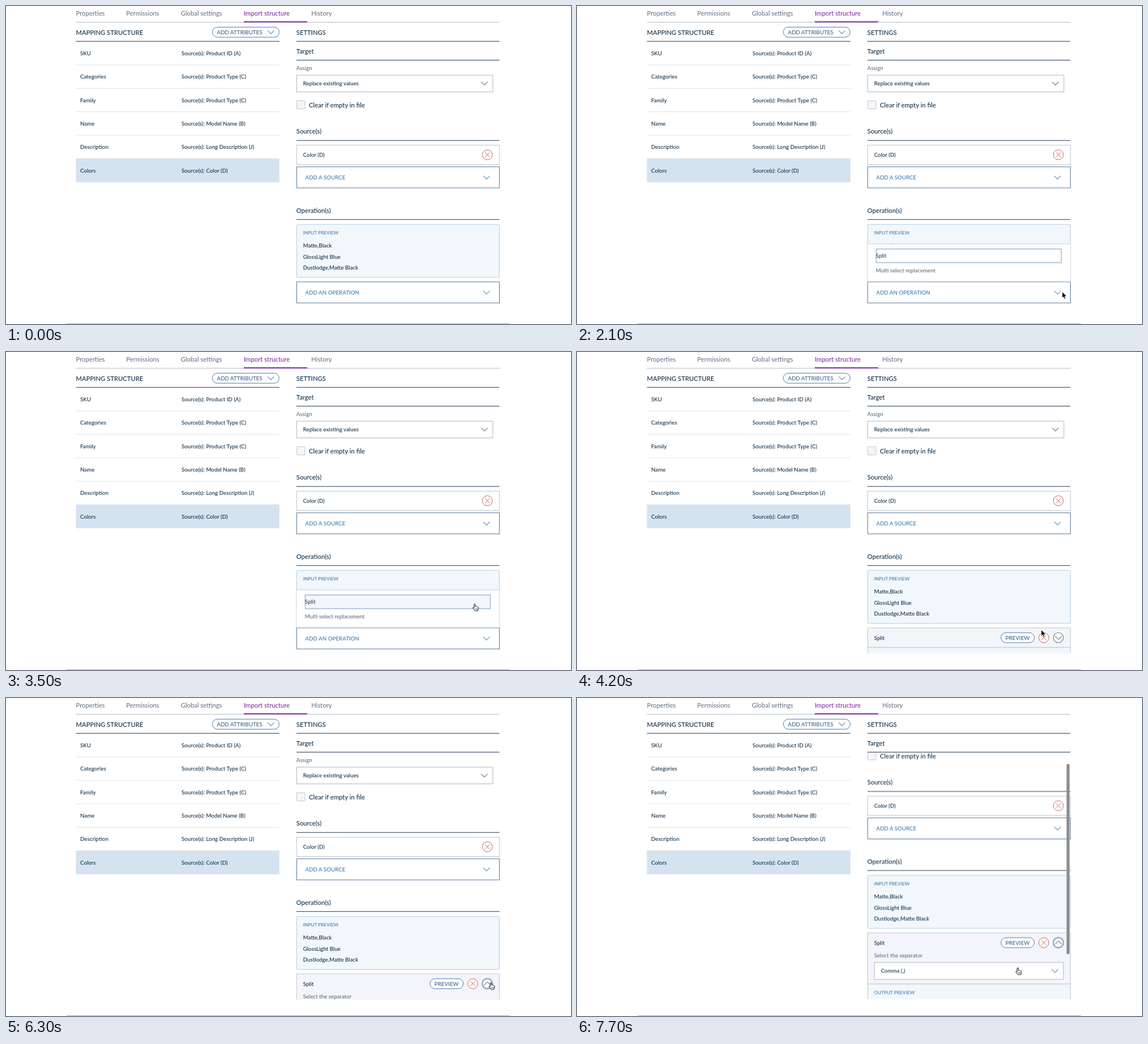
Recreate the animation shown at these times as an HTML page. Size 998x561 px, loop 8 s.

```html
<!DOCTYPE html>
<html lang="en">
<head>
<meta charset="utf-8">
<title>Import structure</title>
<style>
html, body { margin: 0; width: 100%; height: 100%; overflow: hidden; background: #fff; }
svg { display: block; width: 998px; height: 561px; }
text { font: 500 9.75px Lato, sans-serif; fill: #11304a; }
.h { font-size: 11.25px; }
.tab { font-size: 11.25px; font-weight: 400; fill: #5f6c80; }
.on { font-weight: 500; fill: #842fa6; }
.soft { font-weight: 400; fill: #526176; }
.act { fill: #3f7cae; }
.cap { font-size: 8.25px; fill: #3f7cae; }
.rule { stroke: #24384f; }
.sep { stroke: #dfe1e6; }
.box { fill: #fff; stroke: #bfc4cd; }
.field { fill: #fff; stroke: #b0b5c0; }
.add { fill: #fff; stroke: #56789a; }
.pill { fill: #fff; stroke: #4a7ba8; }
.note { fill: #f2f7fb; stroke: #b4cfe5; }
.mark { fill: #d5e3f0; }
.line { fill: none; stroke: #6d7a8c; stroke-width: 1.1; }
.blue { stroke: #4f8fbd; }
.red { fill: #fff; stroke: #c4625c; }

/* State changes are hard cuts on a 700 ms grid (8.75 % of the loop). */
.t { animation: 8s step-end infinite; }
#addOp { animation-name: addOp; }
#menu { animation-name: menu; }
#option { animation-name: option; }
#split { animation-name: split; }
#shut { animation-name: shut; }
#open { animation-name: open; }
#panel { animation-name: panel; }
#scroll { animation-name: scroll; }
#hover { animation-name: hover; }
#thumb { animation-name: thumb; }
#arrow { animation-name: arrow; }
#hand { animation-name: hand; }
@keyframes addOp { 0% { opacity: 1 } 52.5%, 100% { opacity: 0 } }
@keyframes menu { 0% { opacity: 0 } 17.5% { opacity: 1 } 52.5%, 100% { opacity: 0 } }
@keyframes option { 0% { fill: #fff } 35%, 100% { fill: #f3f6fb } }
@keyframes split { 0% { opacity: 0 } 52.5%, 100% { opacity: 1 } }
@keyframes shut { 0% { opacity: 1 } 78.75%, 100% { opacity: 0 } }
@keyframes open { 0% { opacity: 0 } 78.75%, 100% { opacity: 1 } }
@keyframes panel { 0% { fill: #f4f5fa } 87.5% { fill: #fff } 96.25%, 100% { fill: #f4f5fa } }
@keyframes scroll {
  0% { transform: none }
  87.5% { transform: translateY(-69.4px) }
  96.25%, 100% { transform: translateY(-72.4px) }
}
@keyframes hover { 0% { opacity: 0 } 87.5% { opacity: 1 } 96.25%, 100% { opacity: 0 } }
@keyframes thumb {
  0% { opacity: 0; fill: #666 }
  87.5% { opacity: 1; fill: #666 }
  96.25%, 100% { opacity: 1; fill: #8e8e8e; transform: translateY(2.4px) }
}
@keyframes arrow {
  0% { opacity: 0 }
  8.75% { opacity: 1; transform: translate(857px, 504px) }
  35% { opacity: 0 }
  52.5% { opacity: 1; transform: translate(820px, 490px) }
  70%, 100% { opacity: 0 }
}
@keyframes hand {
  0% { opacity: 0 }
  35% { opacity: 1; transform: translate(836px, 451px) }
  43.75% { opacity: 1; transform: translate(829.5px, 450.5px) }
  52.5% { opacity: 0 }
  70% { opacity: 1; transform: translate(856px, 507px) }
  78.75% { opacity: 1; transform: translate(858px, 508px) }
  87.5% { opacity: 1; transform: translate(847.5px, 473px) }
  96.25%, 100% { opacity: 1; transform: translate(780px, 482px) }
}
</style>
</head>
<body>
<svg viewBox="0 0 998 561">
  <defs>
    <path id="down" d="M-5.7-2.8 0 2.8 5.7-2.8"/>
    <g id="remove">
      <circle class="red" r="8.8"/>
      <path class="red" d="M-4-4 4 4M4-4-4 4"/>
    </g>
    <clipPath id="view"><rect x="505" y="96" width="375" height="435.5"/></clipPath>
  </defs>

  <!-- Tabs -->
  <text class="tab" x="123.5" y="16.8">Properties</text>
  <text class="tab" x="212.3" y="16.8">Permissions</text>
  <text class="tab" x="308.8" y="16.8">Global settings</text>
  <text class="tab on" x="420" y="16.8">Import structure</text>
  <text class="tab" x="539.3" y="16.8">History</text>
  <path d="M123.5 28.7H871.5" stroke="#b4b7be"/>
  <path d="M420 28H532" stroke="#842fa6" stroke-width="2"/>

  <!-- Mapping -->
  <text class="h" x="123.5" y="50.5">MAPPING STRUCTURE</text>
  <rect class="pill" x="364.5" y="37.3" width="118" height="17.8" rx="8.9"/>
  <text x="372.5" y="49.8" style="fill:#3c6288">ADD ATTRIBUTES</text>
  <use class="line blue" href="#down" x="468" y="46.2"/>
  <path class="rule" d="M123.5 62.3H483"/>
  <g id="rows"></g>

  <!-- Settings -->
  <text class="h" x="512.8" y="50.5">SETTINGS</text>
  <path class="rule" d="M513 62.3H871.5"/>
  <text class="h" x="512.8" y="83.5">Target</text>

  <g clip-path="url(#view)">
    <g id="scroll" class="t">
      <text class="soft" x="512.8" y="113">Assign</text>
      <rect class="field" x="513.5" y="122" width="346.5" height="29.5"/>
      <text x="524.7" y="140.3">Replace existing values</text>
      <use class="line" href="#down" x="845" y="136.6"/>
      <rect x="513.5" y="167" width="14.5" height="14.5" rx="1" fill="#f5f5fa" stroke="#c3c7d3"/>
      <text class="h" x="535" y="178.6">Clear if empty in file</text>

      <text class="h" x="512.8" y="225.4">Source(s)</text>
      <path class="rule" d="M513 237.2H871.5"/>
      <rect class="box" x="513.5" y="245.5" width="358" height="34"/>
      <text x="524.7" y="266.2">Color (D)</text>
      <use href="#remove" x="850.3" y="262.4"/>
      <rect class="add" x="513.5" y="283.7" width="358" height="37.2"/>
      <text class="act" x="528.5" y="306">ADD A SOURCE</text>
      <use class="line blue" href="#down" x="848.8" y="302.4"/>

      <text class="h" x="512.8" y="365">Operation(s)</text>
      <path class="rule" d="M513 376.7H871.5"/>
      <rect class="note" x="513.5" y="385.3" width="358" height="93.5" rx="1"/>
      <g id="hover" class="t">
        <rect class="mark" x="522" y="451.5" width="340" height="20"/>
        <path class="line" d="M848.5 457.2A4.2 4.2 0 0 0 848.5 465.2M851.5 457.2A4.2 4.2 0 0 1 851.5 465.2M847.3 456.6h2v2M852.7 465.8h-2v-2"/>
      </g>
      <text class="cap" x="524.7" y="403.4">INPUT PREVIEW</text>
      <text x="524.7" y="426">Matte,Black</text>
      <text x="524.7" y="445.6">GlossLight Blue</text>
      <text x="524.7" y="465.2">Dustlodge,Matte Black</text>

      <g id="addOp" class="t">
        <rect class="add" x="513.5" y="486.7" width="358" height="37.2"/>
        <text class="act" x="528.5" y="509.2">ADD AN OPERATION</text>
        <use class="line blue" href="#down" x="848.8" y="505.5"/>
      </g>

      <g id="split" class="t">
        <g id="shut" class="t">
          <rect class="note" x="513.5" y="521" width="358" height="60"/>
          <rect x="513.5" y="486.7" width="358" height="34.3" fill="#f4f5fa" stroke="#c3c7d0"/>
          <circle class="line" cx="850.3" cy="504" r="8.8" style="fill:#fff"/>
          <use class="line" href="#down" x="850.3" y="504.3"/>
        </g>
        <g id="open" class="t">
          <rect class="note" x="513.5" y="576.8" width="358" height="93.5"/>
          <text class="cap" x="524.7" y="595">OUTPUT PREVIEW</text>
          <rect id="panel" class="t" x="513.5" y="486.7" width="358" height="90" stroke="#c3c7d0"/>
          <text class="soft" x="524.7" y="530">Select the separator</text>
          <rect class="field" x="525.2" y="539" width="334" height="29.7"/>
          <text x="536.7" y="557.4">Comma (,)</text>
          <use class="line" href="#down" x="844.3" y="553.8"/>
          <circle cx="850.3" cy="504" r="9.6" fill="#fff" stroke="#bcd3e8" stroke-width="2"/>
          <circle class="line" cx="850.3" cy="504" r="8.6"/>
          <use class="line" href="#down" transform="translate(850.3 503.7) scale(1 -1)"/>
        </g>
        <text x="524.7" y="507.5">Split</text>
        <rect class="pill" x="748.8" y="495.2" width="59" height="17.6" rx="8.8"/>
        <text x="756.8" y="507.5" style="fill:#3c6288">PREVIEW</text>
        <use href="#remove" x="824.5" y="504"/>
      </g>
    </g>

    <g id="menu" class="t">
      <rect x="512.8" y="419.7" width="359.2" height="66.5" fill="#fff"/>
      <path d="M512.8 486V419.7H872V486" fill="none" stroke="#cdd2da"/>
      <rect id="option" class="t" x="528.5" y="428.7" width="327" height="24" stroke="#a9bfd8" stroke-width="1.7"/>
      <text x="527.8" y="444" style="fill:#2c4259">Split</text>
      <text class="soft" x="527.8" y="469.7">Multi select replacement</text>
    </g>
    <rect id="thumb" class="t" x="864.7" y="114" width="5.4" height="335.5" rx="2"/>
  </g>
  <path class="rule" d="M513 95.5H871.5"/>
  <path d="M107.5 560.5H890" stroke="#a6a8ab"/>

  <!-- Pointers -->
  <path id="arrow" class="t" d="M0 0V11.2L2.5 8.9 4.2 12.9 6.2 12 4.5 8.2H8Z" stroke="#fff" stroke-width=".8"/>
  <g id="hand" class="t" fill="#fff" stroke="#111" stroke-linejoin="round">
    <path d="M-2.6.8V-5a1.1 1.1 0 0 1 2.2 0V-1.6q1.1-.8 1.9.3 1.2-.6 1.8.5 1.5-.4 1.6 1V2.6L3.9 6H-1.2L-4.6 1.7q-.8-1.4.4-1.6.8 0 1.6 1.2z"/>
    <path d="M-.4 1.8V4M1.3 1.8V4M3 1.8V4" stroke-width=".7"/>
  </g>
</svg>
<script>
const rows = [
  ["SKU", "Product ID (A)"],
  ["Categories", "Product Type (C)"],
  ["Family", "Product Type (C)"],
  ["Name", "Model Name (B)"],
  ["Description", "Long Description (J)"],
  ["Colors", "Color (D)"]
];
const pitch = 41.4;
document.getElementById("rows").innerHTML = rows.map(([name, source], i) => {
  const top = 62.5 + i * pitch;
  const base = i < rows.length - 1
    ? `<path class="sep" d="M123.5 ${top + pitch}H483"/>`
    : `<rect class="mark" x="123.5" y="${top}" width="359.5" height="${pitch}"/>`;
  return `${base}<text x="131" y="${top + 24.3}">${name}</text>
    <text x="310" y="${top + 24.3}">Source(s): ${source}</text>`;
}).join("");
</script>
</body>
</html>
```
